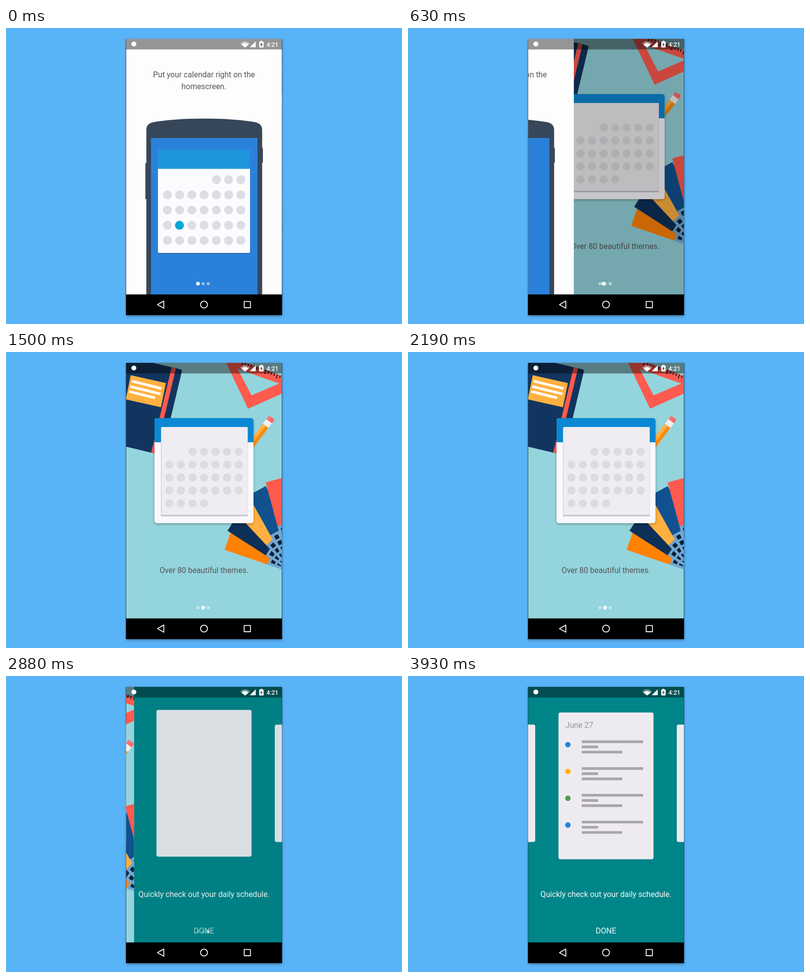
Animation of 800 by 600 pixels, one loop 4.63 s. Source, as an HTML page with a canvas:

```html
<!DOCTYPE html>
<html lang="en">
<head>
<meta charset="utf-8">
<title>Calendar intro</title>
<style>
html, body { margin: 0; width: 100%; height: 100%; overflow: hidden; background: #59b3f7; }
canvas { display: block; }
</style>
</head>
<body>
<canvas id="stage" width="800" height="600"></canvas>
<script>
const ctx = document.getElementById('stage').getContext('2d');
const LOOP = 4630;
const LEFT = 242.5, RIGHT = 557.5, WIDTH = 315, TOP = 22, BOTTOM = 540;
const FONT = 'Roboto, sans-serif';

const clamp = v => Math.max(0, Math.min(1, v));
const fade = (t, start, length) => clamp((t - start) / length);

function rect(x, y, w, h, color, radius = 0) {
  ctx.fillStyle = color;
  ctx.beginPath();
  ctx.roundRect(x, y, w, h, radius);
  ctx.fill();
}

function circle(x, y, r, color) {
  ctx.fillStyle = color;
  ctx.beginPath();
  ctx.arc(x, y, r, 0, Math.PI * 2);
  ctx.fill();
}

function poly(points, color) {
  ctx.fillStyle = color;
  ctx.beginPath();
  points.forEach(p => ctx.lineTo(...p));
  ctx.closePath();
  ctx.fill();
}

function line(x1, y1, x2, y2, width, color) {
  ctx.strokeStyle = color;
  ctx.lineWidth = width;
  ctx.beginPath();
  ctx.moveTo(x1, y1);
  ctx.lineTo(x2, y2);
  ctx.stroke();
}

function text(str, x, y, color, align = 'center', font = '15.75px ') {
  ctx.font = font + FONT;
  ctx.textAlign = align;
  ctx.fillStyle = color;
  ctx.fillText(str, x, y);
}

function group(draw, { x = 0, y = 0, angle = 0, alpha = 1 } = {}) {
  ctx.save();
  ctx.translate(x, y);
  ctx.rotate(angle * Math.PI / 180);
  ctx.globalAlpha *= alpha;
  draw();
  ctx.restore();
}

function clipped(x, y, w, h, draw) {
  ctx.save();
  ctx.beginPath();
  ctx.rect(x, y, w, h);
  ctx.clip();
  draw();
  ctx.restore();
}

// A drag that speeds up until release, then a quintic fling.
function swipe(t, { start, release, reached, rest, stop, power }) {
  if (t <= start) return 0;
  if (t >= stop) return 1;
  if (t < release) return reached * ((t - start) / (release - start)) ** power;
  return 1 - (1 - reached) * ((rest - t) / (rest - release)) ** 5;
}
const FIRST = { start: 150, release: 300, reached: 0.16, rest: 2049, stop: 1500, power: 2.2 };
const SECOND = { start: 2190, release: 2490, reached: 0.259, rest: 3436, stop: 3300, power: 3 };

function dayGrid(x, y, dx, dy, r, first, last, color) {
  for (let i = first; i <= last; i++)
    circle(x + i % 7 * dx, y + Math.floor(i / 7) * dy, r, color);
}

function homescreenPage(scroll) {
  group(() => {
    rect(LEFT, TOP, WIDTH, BOTTOM - TOP, '#fefdfe');
    text('Put your calendar right on the', 400, 100, '#555');
    text('homescreen.', 400, 124, '#555');
    const body = '#37475a';
    rect(281.5, 274, 4, 73, body, 1);
    rect(515, 243, 4, 30, body, 1);
    ctx.fillStyle = body;
    ctx.beginPath();
    ctx.moveTo(283.5, 545);
    ctx.lineTo(283.5, 207);
    ctx.quadraticCurveTo(283.5, 194, 297, 191);
    ctx.quadraticCurveTo(340, 183.5, 400.5, 183.5);
    ctx.quadraticCurveTo(461, 183.5, 504, 191);
    ctx.quadraticCurveTo(517.5, 194, 517.5, 207);
    ctx.lineTo(517.5, 545);
    ctx.fill();
    rect(293, 223, 215, 320, '#2a81da');
  }, { x: -scroll });
  group(() => {
    rect(307, 249, 186, 208.5, 'rgba(20,60,110,.5)', 3);
    rect(307, 247, 186, 209, '#fdfbfe', 3);
    rect(307, 247, 186, 38.5, '#1f95dc', [3, 3, 0, 0]);
    dayGrid(326, 307.3, 24.75, 30.85, 9, 4, 34, '#dedce4');
    circle(350.4, 399.8, 9, '#07a6da');
  }, { x: -scroll * 1.2 });
}

function notebook() {
  group(() => {
    rect(-150, 0, 150, 178, '#12355f', 4);
    rect(-22, 0, 9, 178, '#ff5a4e');
  }, { x: 356, y: 36, angle: 13.4 });
  poly([[252, 47], [323, 63], [313, 112], [242, 96]], '#ffb140');
  line(254, 59, 314, 74, 5, '#fff');
  line(251, 70, 312, 85, 5, '#fff');
  line(249, 80, 301, 93, 5, '#fff');
}

function setSquare() {
  ctx.fillStyle = '#ff5a4e';
  ctx.beginPath();
  [[436, 3.6], [489, 115], [601, 64.6]].forEach(p => ctx.lineTo(...p));
  ctx.closePath();
  ctx.moveTo(468, 34);
  [[496, 88], [552, 64]].forEach(p => ctx.lineTo(...p));
  ctx.closePath();
  ctx.fill('evenodd');
  group(() => {
    for (let i = 0; i < 15; i++) rect(i * 6.2, 0, 2, i % 4 ? 6 : 9, '#23262e');
  }, { x: 478, y: 19, angle: 20.3 });
}

function pencil() {
  group(() => {
    rect(-7, 0, 14, 10, '#fb7474', [2, 2, 0, 0]);
    rect(0, 0, 7, 10, '#f86a68', [0, 2, 0, 0]);
    rect(-7, 9, 14, 12, '#f4efee');
    rect(-7, 21, 7, 90, '#ffb140');
    rect(0, 21, 7, 90, '#ff8a0a');
  }, { x: 537, y: 133, angle: 37 });
}

function swatches() {
  ['#ff8205', '#0d3058', '#ffb040', '#11518f', '#ff5a4e'].forEach((color, i) => {
    group(() => {
      const r = 150 + i * 7;
      rect(92 - r, -20, 46, 40, '#70a7d2');
      for (const row of [0, 1, 2])
        for (const col of [0, 1]) rect(97 - r + row * 13, -7 + col * 13, 8.5, 8.5, '#0a2038');
      rect(-r, -20, 92, 40, color);
    }, { x: 590, y: 431, angle: 19 + i * 14 });
  });
}

function themesCalendar() {
  ctx.save();
  ctx.shadowColor = 'rgba(0,0,0,.3)';
  ctx.shadowBlur = 5;
  ctx.shadowOffsetY = 2;
  rect(300, 134, 200, 213, '#faf8fc', 5);
  ctx.restore();
  rect(300, 134, 200, 49, '#0a88d4', [5, 5, 0, 0]);
  rect(313, 153, 175.5, 180, '#c8c6cc', 1);
  rect(314, 152, 174, 178, '#efedf1');
  dayGrid(330, 202, 23.33, 26.25, 8.3, 2, 31, '#dddbdf');
}

function themesPage(entering, leaving) {
  rect(LEFT, TOP, WIDTH, BOTTOM - TOP, '#94d4dc');
  group(() => {
    notebook();
    setSquare();
    pencil();
    swatches();
  }, { x: entering * 0.1 - leaving * 0.95 });
  group(themesCalendar, { x: entering * 0.2 - leaving * 1.1 });
  text('Over 80 beautiful themes.', 400 + entering * 0.2 - leaving, 448, '#555');
}

function agendaRow(y, color) {
  circle(323, y, 5.5, color);
  [124, 33, 82].forEach((w, i) => rect(351, y - 8.7 + i * 10.5, w, 5.4, '#a9a7ab'));
}

function schedulePage(t, progress) {
  const card = '#eeebf0';
  rect(LEFT, TOP, WIDTH, BOTTOM - TOP, '#008589');
  group(() => {
    rect(200, 98.5, 57, 238, card, 4);
    rect(543, 98.5, 57, 238, card, 4);
    group(() => {
      rect(304, 74, 192, 297.5, card, 4);
      const item = (i, draw) => group(draw, { alpha: fade(t, 3240 + i * 110, 250) });
      item(0, () => text('June 27', 318, 105, '#969498', 'left'));
      ['#1d83dc', '#ffb308', '#4a9f52', '#1d83dc'].forEach((color, i) =>
        item(i + 1, () => agendaRow(139.2 + i * 54.3, color)));
    }, { y: -(1 - progress) * WIDTH * 0.33 });
  }, { alpha: progress });
  group(() => text('Quickly check out your daily schedule.', 400, 448, '#f5fafa'),
    { alpha: Math.sqrt(progress) });
}

function dim(remaining) {
  rect(LEFT, TOP, WIDTH, BOTTOM - TOP, `rgba(0,0,0,${0.7 * remaining})`);
}

function sector(r, color) {
  ctx.fillStyle = color;
  ctx.beginPath();
  ctx.moveTo(483, 39.5);
  ctx.arc(483, 39.5, r, -Math.PI * 0.79, -Math.PI * 0.21);
  ctx.fill();
}

function statusBar() {
  rect(LEFT, TOP, WIDTH, 21.5, 'rgba(0,0,0,.41)');
  circle(258.3, 32.5, 5, '#fff');
  sector(12.5, 'rgba(255,255,255,.4)');
  sector(9, '#fff');
  poly([[492.5, 39], [504.5, 39], [504.5, 27]], '#fff');
  rect(511.5, 27.5, 9, 12, '#fff', 1);
  rect(514, 26, 4, 2, '#fff');
  poly([[516.8, 29], [513.3, 34.2], [515.4, 34.2], [515.2, 38], [518.7, 32.8], [516.6, 32.8]], '#555');
  text('4:21', 550.3, 37.5, '#fff', 'right', '500 12.25px ');
}

function navBar() {
  rect(LEFT, BOTTOM, WIDTH, 42, '#000');
  ctx.strokeStyle = '#f2f2f2';
  ctx.lineWidth = 1.8;
  ctx.lineJoin = 'round';
  ctx.beginPath();
  ctx.moveTo(306, 560.7);
  ctx.lineTo(318.8, 553.4);
  ctx.lineTo(318.8, 568);
  ctx.closePath();
  ctx.moveTo(407, 560.7);
  ctx.arc(400, 560.7, 7, 0, Math.PI * 2);
  ctx.rect(481.2, 554.4, 12.6, 12.6);
  ctx.stroke();
}

function pager(position, done) {
  group(() => {
    for (let i = 0; i < 3; i++) circle(387.8 + i * 10.4, 518.3, 3.1, 'rgba(255,255,255,.5)');
    circle(387.8 + position * 10.4, 518.3, 3.7, '#fff');
  }, { alpha: 1 - done });
  group(() => text('DONE', 400, 521.5, '#f5fafa'), { alpha: done });
}

function draw(t) {
  const a = swipe(t, FIRST), b = swipe(t, SECOND);
  const first = a * WIDTH, second = b * WIDTH;

  rect(0, 0, 800, 600, '#59b3f7');
  ctx.save();
  ctx.shadowColor = 'rgba(0,0,0,.4)';
  ctx.shadowBlur = 5;
  ctx.shadowOffsetY = 2;
  rect(LEFT, TOP, WIDTH, 560, '#000');
  ctx.restore();

  clipped(LEFT, TOP, WIDTH, BOTTOM - TOP, () => {
    if (b > 0) {
      schedulePage(t, b);
      dim(1 - b);
    }
    clipped(LEFT, TOP, WIDTH - second, BOTTOM - TOP, () => {
      themesPage(WIDTH - first, second);
      dim(1 - a);
    });
    clipped(LEFT, TOP, WIDTH - first, BOTTOM - TOP, () => homescreenPage(first));
    pager(a + b, fade(t, 2700, 290));
    statusBar();
  });
  navBar();
}

function tick() {
  draw(performance.now() % LOOP);
  requestAnimationFrame(tick);
}
tick();
</script>
</body>
</html>
```
